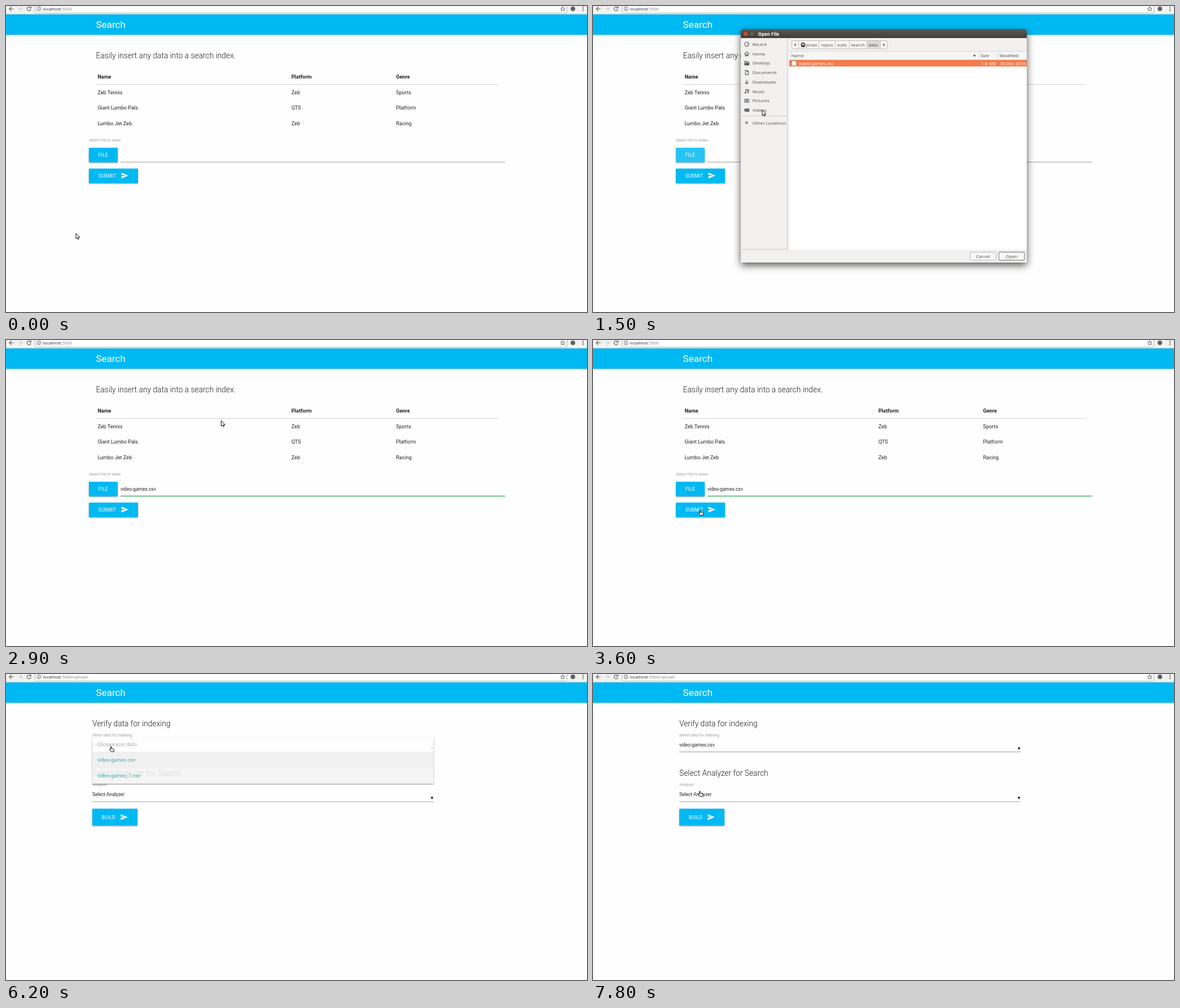
These frames come from a looping animation (1030x544 px, 8 s). An HTML page:

```html
<!DOCTYPE html>
<html lang="en">
<head>
<meta charset="utf-8">
<title>Search index demo</title>
<style>
html, body { margin: 0; height: 100%; overflow: hidden; background: #fefefe; }
svg { display: block; }
#stage { width: 100vw; height: 100vh; }
text { white-space: pre; }
.page text { font: 9.1px Roboto, sans-serif; fill: #212121; }
.page .h { font-size: 13.8px; font-weight: 300; }
.page .th { font-weight: 700; }
.page .label { font-size: 6.75px; fill: #9e9e9e; }
.page .value { font-size: 8.4px; }
.page .btn { font-size: 8.4px; letter-spacing: .28px; fill: #fff; }
.page .option { font-size: 9px; fill: #26a69a; }
.blue { fill: #00b9f3; }
.raised { filter: drop-shadow(0 1px 1px #0006); }
.line { stroke: #9e9e9e; }
.ui text { font: 8px "Open Sans", sans-serif; }
.icon { fill: none; stroke: currentColor; stroke-width: 1.1; }
</style>
</head>
<body>
<svg id="stage" viewBox="0 0 1030 544">
  <defs>
    <path id="send" fill="#fff" transform="scale(.58)" d="M2 21 23 12 2 3v7l15 2-15 2z"/>
    <path id="house" d="M0 4.5 4 .5 8 4.5M1.5 4V8H3.2V5.5H4.8V8H6.5V4"/>
    <clipPath id="reveal"><rect id="revealBox" x="140" y="105" width="640" height="0"/></clipPath>
  </defs>
  <rect width="1030" height="544" fill="#fefefe"/>

  <g class="page">
    <rect class="blue" y="15" width="1030" height="36" style="filter:drop-shadow(0 1px 1px #0005)"/>
    <text x="159.6" y="39" style="font-size:17px;fill:#fff">Search</text>
  </g>

  <g class="ui">
    <rect width="1030" height="14.5" fill="#f3f2f1"/>
    <path d="M0 14.5H1030" stroke="#cfcdca"/>
    <path d="M51.5-2V10.5Q51.5 12.5 53.5 12.5H992.5Q994.5 12.5 994.5 10.5V-2" fill="#fff" stroke="#b9b7b5"/>
    <g class="icon" color="#555">
      <path d="M13.5 5H6M9.5 1.3 5.8 5 9.5 8.7"/>
      <path d="M21 5H28.5M25 1.3 28.7 5 25 8.7" stroke="#ccc"/>
      <path d="M43.4 3A3.4 3.4 0 1 0 44 6M44.2 1V3.8H41.3"/>
      <circle cx="58.5" cy="5" r="3.5" stroke-width=".9"/>
      <path d="M58.5 4.5V7.2M58.5 2.8V3.8"/>
      <path d="M987 1 988.1 3.9 991 4 988.8 5.8 989.6 8.8 987 7.1 984.4 8.8 985.2 5.8 983 4 985.9 3.9z" stroke-width=".9"/>
    </g>
    <circle cx="1005" cy="5" r="4" fill="#56655a"/>
    <path d="M1023 1.3V2.9M1023 4.3V5.9M1023 7.3V8.9" stroke="#555" stroke-width="1.7"/>
    <text x="65.7" y="8" style="font-size:7.6px" fill="#222">localhost<tspan fill="#808080">:5000<tspan id="path"></tspan></tspan></text>
  </g>

  <g class="page" id="home">
    <text class="h" x="159.6" y="92.5">Easily insert any data into a search index.</text>
    <g id="table"></g>
    <path d="M160 139.5H873" stroke="#d0d0d0"/>
    <text class="label" x="147" y="241.3">Select File to Index</text>
    <g class="raised"><svg x="147" y="252" width="51" height="26">
      <rect class="blue" width="51" height="26" rx="1"/>
      <circle id="fileRipple" cx="24" cy="12" fill="#fff"/>
    </svg></g>
    <text class="btn" x="163.7" y="268">FILE</text>
    <path id="field" d="M203 277.5H885"/>
    <text class="value" id="chosen" x="203" y="268.3">video-games.csv</text>
    <g class="raised"><svg x="147" y="289" width="87" height="26">
      <rect class="blue" width="87" height="26" rx="1"/>
      <circle id="submitRipple" cx="43" cy="13" fill="#fff"/>
    </svg></g>
    <text class="btn" x="163.7" y="304.5">SUBMIT</text>
    <use href="#send" x="203.5" y="294.5"/>
  </g>

  <g class="page" id="upload">
    <text class="h" x="153" y="92.5">Verify data for indexing</text>
    <text class="label" x="153" y="111">Select data for Indexing</text>
    <text class="value" id="dataFile" x="153" y="129"></text>
    <path class="line" d="M153 138.5H758"/>
    <path d="M753 130.5H757.4L755.2 135z"/>
    <text class="h" x="153" y="180.5">Select Analyzer for Search</text>
    <text class="label" x="153" y="199">Analyzer</text>
    <text class="value" x="153" y="217">Select Analyzer</text>
    <path class="line" d="M153 227H758"/>
    <path d="M753 218.5H757.4L755.2 223z"/>
    <rect class="blue raised" x="153" y="239.5" width="80" height="30" rx="1"/>
    <text class="btn" x="169.8" y="257.7">BUILD</text>
    <use href="#send" x="202.3" y="247.5"/>
    <g id="menu" clip-path="url(#reveal)">
      <rect x="153" y="113" width="605" height="82" fill="#fff" style="filter:drop-shadow(0 1px 1px #0008)"/>
      <rect x="153" y="139" width="605" height="28" fill="#eee"/>
      <rect x="153" y="167" width="605" height="28" fill="#f4f4f4"/>
      <text class="option" x="162" y="128.3" style="fill:#b0b0b0">Choose your data</text>
      <text class="option" x="162" y="156.3">video-games.csv</text>
      <text class="option" x="162" y="184">video-games_1.csv</text>
    </g>
  </g>

  <g class="ui" id="dialog" fill="#4c4c4c">
    <path d="M262 456V45Q262 41 266 41H765Q769 41 769 45V456z" fill="#f2f1f0" style="filter:drop-shadow(0 5px 7px #000a)"/>
    <linearGradient id="bar" x2="0" y2="1"><stop stop-color="#5b5a53"/><stop offset="1" stop-color="#3e3d39"/></linearGradient>
    <path d="M262 57V45Q262 41 266 41H765Q769 41 769 45V57z" fill="url(#bar)"/>
    <circle cx="270.6" cy="49.6" r="4" fill="#ee5a2f" stroke="#35342f" stroke-width=".7"/>
    <path d="M269 48 272.2 51.2M272.2 48 269 51.2" stroke="#5b2411"/>
    <circle cx="281.6" cy="49.6" r="3.8" fill="#75736c" stroke="#35342f" stroke-width=".7"/>
    <path d="M280 48.2H283.2V51H280z" fill="none" stroke="#45443f" stroke-width=".8"/>
    <text x="292.6" y="52.7" fill="#fff" style="font-weight:700">Open File</text>
    <path d="M344.5 57V432.5H263M263 195.5H344" fill="none" stroke="#cfcdca"/>
    <g id="places"></g>
    <rect x="352.5" y="61.5" width="169" height="14.5" rx="2" fill="#f7f6f5" stroke="#bfbdba"/>
    <rect x="485" y="62" width="24.5" height="13.5" fill="#dcdad7"/>
    <path d="M364.5 62V76M400.5 62V76M429.5 62V76M454.5 62V76M485.5 62V76M509.5 62V76" stroke="#c9c7c4"/>
    <path d="M359.5 66.5V71.5L356.5 69zM514.5 66.5V71.5L517.5 69z"/>
    <use class="icon" href="#house" x="368.5" y="64.5"/>
    <text y="72"><tspan x="377.4">jonas</tspan><tspan x="404.3">repos</tspan><tspan x="432.8">suits</tspan><tspan x="457.3">search</tspan><tspan x="488.2">data</tspan></text>
    <rect x="348" y="80" width="421" height="353" fill="#fff"/>
    <rect x="348" y="80" width="421" height="15.5" fill="#f6f5f4"/>
    <path d="M348 80.5H769M348 95.5H769M684.5 81V95M717.5 81V95" stroke="#dad8d5"/>
    <path d="M673.3 89.3H679L676.1 86z"/>
    <text y="91"><tspan x="351.5">Name</tspan><tspan x="687.5">Size</tspan><tspan x="720.7">Modified</tspan></text>
    <rect id="row" x="348" y="96" width="421" height="11.5"/>
    <path d="M352.5 97.5H358L360.5 100V106H352.5z" fill="#f8f8f8" stroke="#aaa" stroke-width=".8"/>
    <text id="rowText" y="105"><tspan x="365">video-games.csv</tspan><tspan x="688.3">1.6 MB</tspan><tspan x="721.3">30 Dec 2016</tspan></text>
    <rect x="668.5" y="437.5" width="46" height="14.5" rx="2.5" fill="#f7f6f5" stroke="#b8b6b3"/>
    <rect id="open" x="719.5" y="437.5" width="45.5" height="14.5" rx="2.5" stroke="#96948f" stroke-width="1.3"/>
    <text y="447.6"><tspan x="679">Cancel</tspan><tspan x="731.8">Open</tspan></text>
  </g>

  <path id="cursor" stroke="#111" stroke-width="1" stroke-linejoin="round" fill="#fff"/>
</svg>
<script>
const $ = id => document.getElementById(id);
const set = (id, attrs) => { for (const k in attrs) $(id).setAttribute(k, attrs[k]); };
const show = (id, on) => set(id, { display: on ? 'inline' : 'none' });
const clamp = v => Math.min(1, Math.max(0, v));
const easeOut = p => 1 - (1 - clamp(p)) ** 3;

const rows = [
  ['Name', 'Platform', 'Genre'],
  ['Zeb Tennis', 'Zeb', 'Sports'],
  ['Giant Lumbo Pals.', 'QTS', 'Platform'],
  ['Lumbo Jet Zeb', 'Zeb', 'Racing']
];
$('table').innerHTML = rows.map((row, r) => row.map((cell, i) =>
  `<text class="${r ? '' : 'th'}" x="${[162.4, 506, 691.5][i]}" y="${129 + r * 27.5}">${cell}</text>`).join('')).join('');

// Sidebar entries: label and an 8 by 8 line icon.
const places = [
  ['Recent', 'M4 .3A3.7 3.7 0 1 0 4.1 .3M4 4H6'],
  ['Home', 'M0 4.5 4 .5 8 4.5M1.5 4V8H3.2V5.5H4.8V8H6.5V4'],
  ['Desktop', 'M.5 1H3.5V2.5H8V7.5H.5zM.5 4.5H8M.5 5.5H8M.5 6.5H8'],
  ['Documents', 'M1.5 .5H5L7 2.5V7.8H1.5zM5 .5V2.5H7'],
  ['Downloads', 'M4 .5V7.5M.8 4.5 4 7.7 7.2 4.5'],
  ['Music', 'M2.5 6.5V1H7.3V6M2.5 2.5H7.3M2.5 6.5A1 1 0 1 0 2.4 7M7.3 6A1 1 0 1 0 7.2 6.5'],
  ['Pictures', 'M.5 2H2.5L3 1H5L5.5 2H7.8V7H.5zM4 3A1.4 1.4 0 1 0 4.1 3'],
  ['Videos', 'M2.5 2H8V6.5H2.5zM3 3.5H8M3 5H8M.3 2.5V6L2.5 4.2z'],
  ['Other Locations', 'M4 1V7M1 4H7']
];
$('places').innerHTML = places.map(([name, d], i) => {
  const y = i < 8 ? 68 + i * 16.7 : 207.5;
  return `<path class="icon" color="#555" transform="translate(268.5 ${y - 4})" d="${d}"/>
    <text x="282.7" y="${y + 3}">${name}</text>`;
}).join('');

const ARROW = 'M0 0V9.6L2.2 7.6 3.7 11 5.3 10.3 3.9 7.1H6.9z';
const HAND = 'M-.5 .7Q.3-.2 1.1 .7V4L4.7 4.8Q5.9 5.2 5.7 6.4L5 9.6H.4L-2.2 6.4Q-2.6 5.2-1.6 5.2L-.5 6z';

// Pointer hot spot: time, x, y
const track = [
  [100, 124, 404], [400, 180, 362], [600, 214, 322], [800, 205, 284], [1000, 171, 260],
  [1200, 171, 260], [1500, 300, 185], [1900, 435, 99], [2000, 433, 97],
  [2700, 433, 97], [3100, 330, 190], [3600, 190, 302],
  [4500, 190, 302], [5000, 185, 229], [5400, 180, 106], [5500, 180, 106], [5700, 186, 128.5],
  [6900, 186, 128.5], [7200, 190, 152], [7400, 190, 152], [7800, 189, 208]
];
function pointerAt(t) {
  const i = track.findIndex(k => k[0] >= t);
  if (i < 1) return track[i ? track.length - 1 : 0].slice(1);
  const [a, b] = [track[i - 1], track[i]];
  const p = (t - a[0]) / (b[0] - a[0]);
  return [1, 2].map(j => a[j] + (b[j] - a[j]) * p);
}

const homeLinks = [[147, 252, 198, 278], [147, 289, 234, 315]];
const uploadLinks = [[153, 113, 758, 139], [153, 201, 758, 227], [153, 239, 233, 270]];

function ripple(id, age) {
  set(id, {
    r: age < 0 ? 0 : 14 + age * .135,
    opacity: .25 * (1 - clamp((age - 300) / 500))
  });
}

function render(t) {
  const uploaded = t >= 4000, picked = t >= 2800, focused = t >= 1200;
  show('home', !uploaded);
  show('upload', uploaded);
  $('path').textContent = uploaded ? '/upload' : '';

  ripple('fileRipple', t - 1000);
  ripple('submitRipple', t - 3700);
  show('chosen', picked);
  set('field', picked ? { stroke: '#3db163', 'stroke-width': 1.6 } : { stroke: '#9e9e9e', 'stroke-width': 1 });

  show('dialog', t >= 1100 && !picked);
  set('dialog', { opacity: focused ? 1 : .96, fill: focused ? '#4c4c4c' : '#6b6b68' });
  set('row', { fill: focused ? '#f47c4d' : '#dcdad8' });
  set('rowText', { fill: focused ? '#fff' : '#4c4c4c' });
  set('open', { fill: t >= 2600 ? '#dfddda' : '#f7f6f5' });

  const menuOpen = t >= 6000 && t < 7600;
  show('menu', menuOpen);
  set('menu', { opacity: t < 7300 ? easeOut((t - 5900) / 600) : 1 - clamp((t - 7200) / 400) });
  set('revealBox', { height: 8 + 88 * easeOut((t - 5900) / 300) });
  $('dataFile').textContent = t < 7300 ? 'video-games_1.csv' : 'video-games.csv';

  const [x, y] = pointerAt(t);
  const links = uploaded ? uploadLinks : t > 1200 && !picked ? [] : homeLinks;
  const over = links.some(([l, top, r, b]) => x >= l && x <= r && y >= top && y <= b);
  const hand = over || menuOpen && y < 195;
  set('cursor', { d: hand ? HAND : ARROW, transform: `translate(${x} ${y})` });
}

const start = performance.now();
function tick() {
  const t = (performance.now() - start) % 8000;
  render(Math.floor(t / 100) * 100);
  requestAnimationFrame(tick);
}
tick();
</script>
</body>
</html>
```
